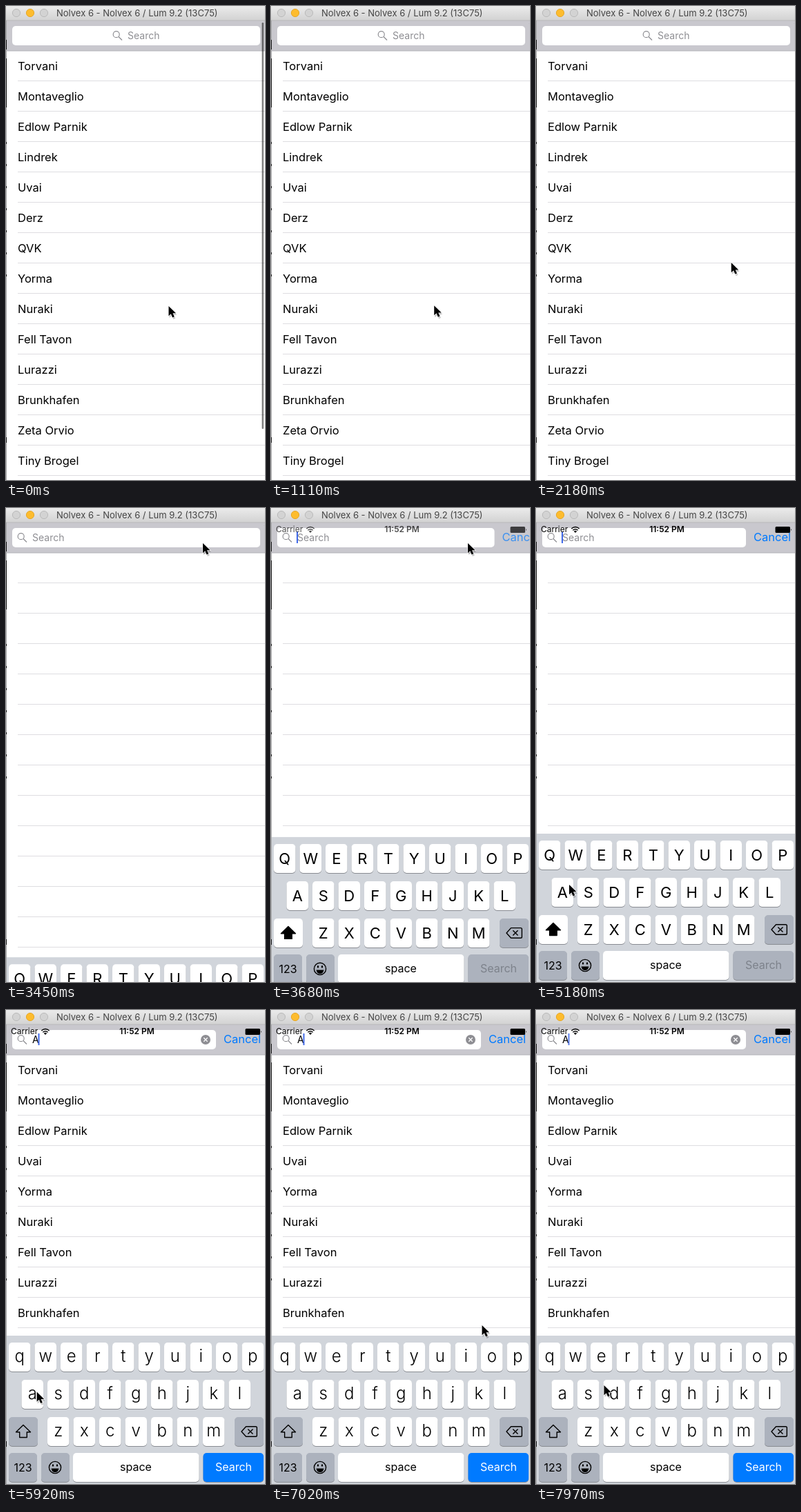
These frames come from a looping animation (375x687 px, 8 s). An HTML page:

```html
<!DOCTYPE html>
<html lang="en">
<head>
<meta charset="utf-8">
<title>Search list</title>
<style>
  html, body { margin: 0; width: 100%; height: 100%; overflow: hidden; background: #fff; }
  svg { display: block; font-family: Inter, Roboto, "Liberation Sans", sans-serif; }
  .row { font-size: 16.5px; }
  .field { font-size: 14px; }
  .keys { text-anchor: middle; }
  .upper { font-size: 22px; }
  .lower { font-size: 24px; font-weight: 300; }
  .label { font-size: 16px; }
</style>
</head>
<body>
<svg id="stage" width="375" height="687" viewBox="0 0 375 687">
  <defs>
    <linearGradient id="chrome" x2="0" y2="1">
      <stop offset="0" stop-color="#ebebeb"/><stop offset="1" stop-color="#d2d2d2"/>
    </linearGradient>
  </defs>
  <rect width="375" height="687" fill="#fff"/>
  <g id="lines" fill="#dedde1"></g>
  <g id="fullList" class="row"></g>
  <g id="shortList" class="row"></g>

  <rect y="21" width="375" height="44" fill="#c9c8ce"/>
  <rect y="64.5" width="375" height="1" fill="#b4b4b9"/>
  <rect id="box" x="9" y="29" height="28" rx="5" fill="#fff"/>
  <g id="hint" class="field" fill="#8e8e93">
    <g fill="none" stroke="#8e8e93" stroke-width="1.2">
      <circle cx="21.7" cy="41.2" r="4.5"/><path d="M25 44.5l5 5"/>
    </g>
    <text id="placeholder" x="38" y="48">Search</text>
  </g>
  <g id="typed">
    <text class="field" x="38" y="48">A</text>
    <circle cx="289" cy="43" r="7" fill="#8e8e93"/>
    <path d="M286.3 40.3l5.4 5.4m0-5.4l-5.4 5.4" stroke="#fff" stroke-width="1.3"/>
  </g>
  <rect id="caret" y="34" width="2" height="17" fill="#3e68e8"/>
  <text id="cancel" class="row" y="48" fill="#007aff">Cancel</text>
  <g id="status" font-size="12">
    <text x="7" y="35.3">Carrier</text>
    <g fill="none" stroke="#000" stroke-width="1.5">
      <path d="M51.3 30q5.7-5 11.4 0M53.3 32.3q3.7-3.2 7.4 0"/>
    </g>
    <path d="M54.8 33.7q2.2-1.8 4.4 0L57 36z"/>
    <text x="189.5" y="35.3" text-anchor="middle" font-weight="600">11:52 PM</text>
    <rect x="346.5" y="27" width="21.5" height="9" rx="1.5"/>
    <path d="M369 30q1.6 1.5 0 3z"/>
  </g>

  <rect id="scrollbar" x="370.5" y="24" width="2.5" height="589" rx="1.25" fill="#000"/>

  <g id="keyboard" class="keys">
    <rect y="472" width="375" height="216" fill="#d1d5db"/>
    <g id="caps"></g>
    <g id="upper" class="upper"></g>
    <g id="lower" class="lower"></g>
    <path id="shift" d="M25 601.5l10.5 10.3h-5.2v7.7h-10.6v-7.7h-5.2z" stroke="#000" stroke-width="1.4" stroke-linejoin="round"/>
    <g fill="none" stroke="#000" stroke-width="1.4" stroke-linejoin="round">
      <path d="M341 611l6.5-7.3h14q1.8 0 1.8 1.8v11q0 1.8-1.8 1.8h-14z"/>
      <path d="M350.3 607.4l7.2 7.2m0-7.2l-7.2 7.2"/>
      <circle cx="71" cy="663" r="8.6"/>
    </g>
    <path d="M65.5 664.5h11q-1 5.5-5.5 5.5t-5.5-5.5z"/>
    <ellipse cx="68" cy="660" rx="1.2" ry="1.8"/><ellipse cx="74" cy="660" rx="1.2" ry="1.8"/>
    <text class="label" x="24.5" y="669">123</text>
    <text class="label" x="188" y="668">space</text>
    <text id="goLabel" class="label" x="329.5" y="668">Search</text>
  </g>

  <rect width="375" height="21" fill="url(#chrome)"/>
  <rect y="20.5" width="375" height="1" fill="#b9b9bb"/>
  <g stroke-width="1">
    <circle cx="15" cy="10" r="5.6" fill="#d3d3d3" stroke="#bababa"/>
    <circle cx="35" cy="10" r="5.6" fill="#fdbc2e" stroke="#e6a727"/>
    <circle cx="55" cy="10" r="5.6" fill="#d3d3d3" stroke="#bababa"/>
  </g>
  <text x="73" y="15" font-size="13" fill="#444">Nolvex 6 - Nolvex 6 / Lum 9.2 (13C75)</text>
  <g id="edge"><rect y="21" width="1" height="666" fill="#a9a9ab"/></g>

  <g id="pointer">
    <path d="M1 2v15l3.5-3 2.3 5 3-1.2-2.2-5H12z" fill="#000" opacity=".22"/>
    <path d="M0 0v14.2l3.3-3 2.3 5.3 2.7-1.2-2.3-5h4.6z" stroke="#fff" stroke-width="1.2" paint-order="stroke"/>
  </g>
</svg>
<script>
const LOOP = 8000, OPEN = 3390, TYPE = 5320;
const ROW = 44;
const names = ['Torvani', 'Montaveglio', 'Edlow Parnik', 'Lindrek', 'Uvai', 'Derz', 'QVK',
  'Yorma', 'Nuraki', 'Fell Tavon', 'Lurazzi', 'Brunkhafen', 'Zeta Orvio', 'Tiny Brogel'];

const $ = id => document.getElementById(id);
function add(parent, tag, attrs, text = '') {
  const el = document.createElementNS('http://www.w3.org/2000/svg', tag);
  for (const k in attrs) el.setAttribute(k, attrs[k]);
  el.textContent = text;
  return $(parent).appendChild(el);
}

function fillList(id, items) {
  items.forEach((name, i) => add(id, 'text', { x: 17, y: 92.7 + i * ROW }, name));
}
fillList('fullList', names);
fillList('shortList', names.filter(name => /a/i.test(name)));
for (let y = 108; y < 687; y += ROW) add('lines', 'rect', { x: 17, y, width: 358, height: 1 });

// Sliver of the window behind the left edge
const sliver = (y, height) => add('edge', 'rect', { y, width: 1, height, fill: '#111' });
sliver(49, 14);
sliver(76, 71);
sliver(625, 8);
for (let y = 197; y < 400; y += 32) sliver(y, 3);

function keycap(x, y, width, fill = '#fff') {
  add('caps', 'rect', { x, y: y + 1, width, height: 42, rx: 5, fill: '#898c92' });
  return add('caps', 'rect', { x, y, width, height: 42, rx: 5, fill });
}
const GRAY = '#acb2bd';
[['QWERTYUIOP', 4], ['ASDFGHJKL', 22.5], ['ZXCVBNM', 60]].forEach(([letters, left], r) => {
  const y = 482 + r * 54;
  [...letters].forEach((c, i) => {
    const x = left + i * 37.5;
    keycap(x, y, 31.5);
    add('upper', 'text', { x: x + 15.75, y: y + 29 }, c);
    add('lower', 'text', { x: x + 15.75, y: y + 27.5 }, c.toLowerCase());
  });
});
const shiftCap = keycap(4, 590, 42);
keycap(331, 590, 42, GRAY);
keycap(4, 642, 41, GRAY);
keycap(51, 642, 41, GRAY);
keycap(97, 642, 182.5);
const goCap = keycap(285.5, 642, 87.5, GRAY);

const clamp = v => Math.max(0, Math.min(1, v));
const smooth = v => v * v * (3 - 2 * v);

// Eased value between [time, value] stops
function track(t, stops) {
  let [t0, v0] = stops[0];
  for (const [t1, v1] of stops) {
    if (t < t1) return v0 + (v1 - v0) * smooth(clamp((t - t0) / (t1 - t0)));
    [t0, v0] = [t1, v1];
  }
  return v0;
}

const pointerStops = [
  [0, 235.5, 435], [1100, 235.5, 435], [1250, 282.5, 378], [2165, 282.5, 378],
  [2330, 290.5, 155], [2610, 290.5, 155], [3040, 285, 51], [3720, 285, 51],
  [3940, 145, 450], [4400, 145, 450], [5100, 48, 546], [5350, 48, 546],
  [5530, 43.5, 554], [5910, 43.5, 554], [6200, 305.5, 457], [7470, 305.5, 457],
  [7620, 99, 553], [7930, 99, 553], [7970, 98.5, 544]
];
const pointerX = pointerStops.map(([t, x]) => [t, x]);
const pointerY = pointerStops.map(([t, , y]) => [t, y]);

const blink = [[4300, 1], [4440, 0], [4760, 0], [4900, 1], [6060, 1], [6200, 0], [6480, 0],
  [6590, 1], [7010, 1], [7160, 0], [7470, 0], [7620, 1], [7935, 1], [8075, 0]];

const show = (id, on) => $(id).setAttribute('display', on ? 'inline' : 'none');
const set = (id, attr, value) => $(id).setAttribute(attr, value);

function draw(t) {
  const open = t >= OPEN, typed = t >= TYPE;

  show('fullList', !open);
  show('shortList', typed);
  show('typed', typed);
  show('placeholder', !typed);
  set('hint', 'transform', `translate(${open ? 0 : 138})`);
  set('scrollbar', 'opacity', 0.5 * (1 - clamp((t - 280) / 230)));

  const slide = smooth(clamp((t - 3450) / 365));
  set('box', 'width', 359 - 64 * slide);
  set('cancel', 'x', 379 - 64 * slide);
  set('cancel', 'opacity', slide);
  set('status', 'opacity', slide);

  // Critically damped spring
  const s = Math.max(0, t - 3417) * 0.0215;
  set('keyboard', 'transform', `translate(0 ${215 * (1 + s) * Math.exp(-s)})`);
  show('keyboard', open);
  show('upper', !typed);
  show('lower', typed);
  set('shift', 'fill', typed ? 'none' : '#000');
  shiftCap.setAttribute('fill', typed ? GRAY : '#fff');
  goCap.setAttribute('fill', typed ? '#007aff' : GRAY);
  set('goLabel', 'fill', typed ? '#fff' : '#7d828b');

  show('caret', t >= 3600);
  set('caret', 'x', typed ? 46.5 : 37);
  set('caret', 'opacity', track(t, blink));
  set('pointer', 'transform', `translate(${track(t, pointerX)} ${track(t, pointerY)})`);
}

const start = performance.now();
function tick() {
  draw((performance.now() - start) % LOOP);
  requestAnimationFrame(tick);
}
tick();
</script>
</body>
</html>
```
